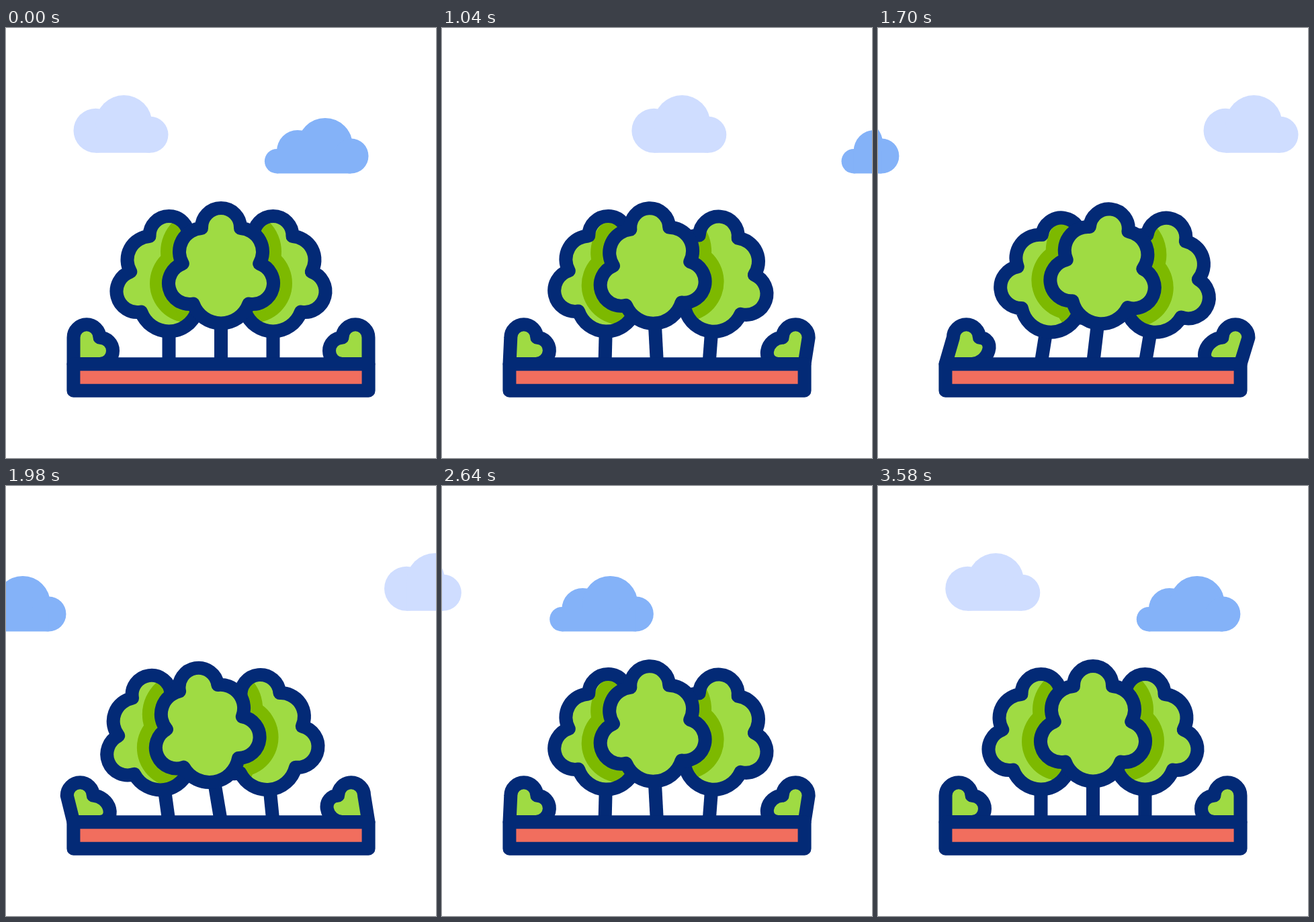
An HTML page that plays this animation: 640 by 640 pixels, repeating every 3600 ms.

```html
<!DOCTYPE html>
<html lang="en">
<head>
<meta charset="utf-8">
<title>Park in the wind</title>
<style>
  html, body { margin: 0; width: 100%; height: 100%; overflow: hidden; background: #fff; }
  svg { display: block; width: 100vw; height: 100vh; }
  .line { fill: none; stroke: #032a76; stroke-width: 20; stroke-linejoin: round; }
  .leaf { fill: #9fdb43; }
  .shade { fill: #7db900; }
</style>
</head>
<body>
<svg viewBox="0 0 640 640">
  <defs>
    <path id="crown"/>
    <g id="shadow">
      <circle cx="320" cy="297" r="57"/>
      <circle cx="293" cy="333" r="63"/><circle cx="347" cy="333" r="63"/>
      <circle cx="273" cy="380" r="59"/><circle cx="367" cy="380" r="59"/>
      <circle cx="320" cy="395.5" r="72"/>
    </g>
    <clipPath id="clipL"><use href="#crown" class="left"/></clipPath>
    <clipPath id="clipR"><use href="#crown" class="right"/></clipPath>
  </defs>

  <g id="pale" fill="#cfddff">
    <circle cx="133.5" cy="152.7" r="33"/>
    <circle cx="175.5" cy="142" r="42"/>
    <circle cx="214.5" cy="158.8" r="27"/>
    <path d="M133.5 150H214.5V185.8H133.5Z"/>
  </g>
  <g id="blue" fill="#84b2f8">
    <circle cx="403.2" cy="198.2" r="18.3"/>
    <circle cx="434" cy="183" r="31"/>
    <circle cx="475" cy="175" r="41"/>
    <circle cx="513.5" cy="190.5" r="26"/>
    <path d="M403.2 183H513.5V216.5H403.2Z"/>
  </g>

  <g class="left">
    <path class="line" d="M320 430V502"/>
    <use href="#crown" class="leaf"/>
  </g>
  <g clip-path="url(#clipL)"><use href="#shadow" class="shade mid"/></g>
  <g class="left"><use href="#crown" class="line"/></g>

  <g class="right">
    <path class="line" d="M320 430V502"/>
    <use href="#crown" class="leaf"/>
  </g>
  <g clip-path="url(#clipR)"><use href="#shadow" class="shade mid"/></g>
  <g class="right"><use href="#crown" class="line"/></g>

  <g class="mid">
    <path class="line" d="M320 430V502"/>
    <use href="#crown" class="leaf"/>
    <use href="#crown" class="line"/>
  </g>

  <path id="bushL" class="line" style="fill:#9fdb43"/>
  <path id="bushR" class="line" style="fill:#9fdb43" transform="matrix(-1 0 0 1 640 0)"/>
  <rect class="line" x="100.4" y="500.3" width="439.2" height="39.4" style="fill:#f16e5e"/>
</svg>
<script>
const LOOP = 3600, SWING = 9.6, LEAN = 12;
const $ = q => document.querySelectorAll(q);
const put = (q, value, name = 'transform') =>
  $(q).forEach(el => el.setAttribute(name, value));

// Outline around a clockwise ring of overlapping lobes [x, y, r]
function outline(lobes) {
  const n = lobes.length;
  const cusps = lobes.map(([x, y, r], i) => {
    const [x2, y2, r2] = lobes[(i + 1) % n];
    const d = Math.hypot(x2 - x, y2 - y), ux = (x2 - x) / d, uy = (y2 - y) / d;
    const a = (r * r - r2 * r2 + d * d) / (2 * d), h = Math.sqrt(r * r - a * a);
    return [x + ux * a + uy * h, y + uy * a - ux * h];
  });
  let d = 'M' + cusps[n - 1];
  lobes.forEach(([x, y, r], i) => {
    const [px, py] = cusps[(i + n - 1) % n], [qx, qy] = cusps[i];
    const turn = Math.atan2(qy - y, qx - x) - Math.atan2(py - y, px - x);
    const big = (turn + 4 * Math.PI) % (2 * Math.PI) > Math.PI ? 1 : 0;
    d += `A${r} ${r} 0 ${big} 1 ${qx} ${qy}`;
  });
  return d + 'Z';
}

put('#crown', outline([
  [320, 297, 29], [347, 333, 35], [367, 380, 31],
  [320, 395.5, 44], [273, 380, 31], [293, 333, 35]
]), 'd');

// Round cap moves by dx, the base stays, the side lobe leans in between
const bush = dx => `M100.5 500L${100.5 + dx} 460.8
  A19.5 19.5 0 0 1 ${139.5 + dx} 460.8
  C${150.3 + dx} 460.8 ${159 + 0.78 * dx} 469.7 ${159 + 0.5 * dx} 480.5
  S150.3 500 139.5 500Z`;

// Sway from -1 to 1: ease in, five half swings, ease out
function sway(t) {
  if (t < 400 || t > 3200) return 0;
  const c = Math.cos(Math.PI * t / 400);
  if (t < 800) return (1 + c) / 2;
  return t < 2800 ? c : (c - 1) / 2;
}

const ease = u => u * u * (3 - 2 * u);

function paleX(t) {
  if (t < 2450) return 583 * ease(t / 2800);
  const s = LOOP - t;
  return -0.351 * s * s / (s + 559);
}

const blueX = t => t < 1480
  ? 270 * ease(t / 1500)
  : -524 * (1 - ease((t - 1480) / 2120));

function draw(t) {
  const tree = (dx, dy, delay) =>
    `translate(${dx} ${dy}) rotate(${SWING * sway(t - delay)} 320 ${500 - dy})`;
  put('.left', tree(-77.5, 12, 60));
  put('.right', tree(77.5, 12, 100));
  put('.mid', tree(0, 0, 0));
  put('#bushL', bush(LEAN * sway(t - 60)), 'd');
  put('#bushR', bush(-LEAN * sway(t - 110)), 'd');
  put('#pale', `translate(${paleX(t)} 0)`);
  put('#blue', `translate(${blueX(t)} 0)`);
}

const start = performance.now();
function tick() {
  draw((performance.now() - start) % LOOP);
  requestAnimationFrame(tick);
}
draw(0);
requestAnimationFrame(tick);
</script>
</body>
</html>
```
